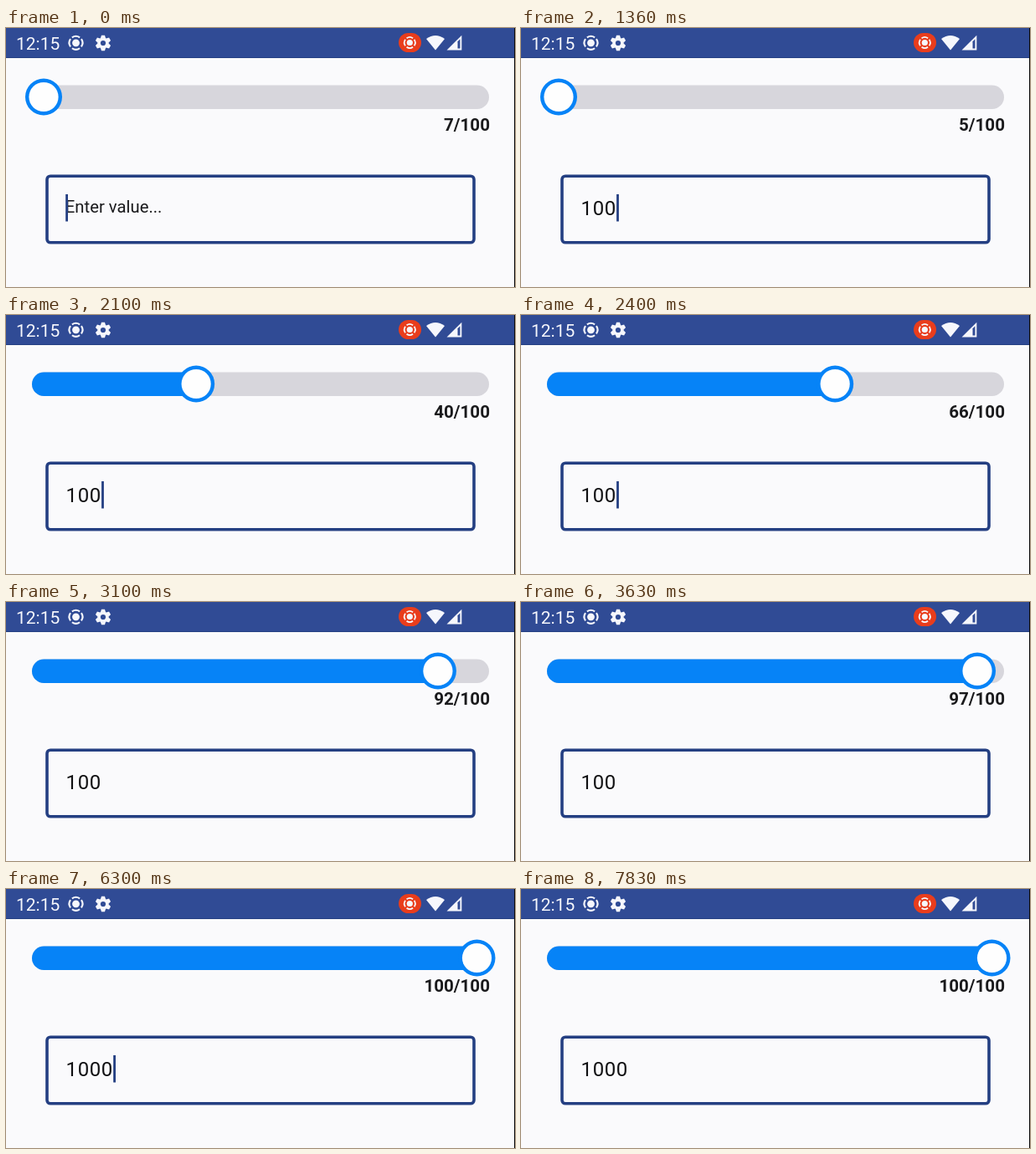
Recreate the animation shown at these times as an HTML page with a canvas. Size 608x310 px, loop 8 s.

```html
<!DOCTYPE html>
<html lang="en">
<head>
<meta charset="utf-8">
<title>Slider with input</title>
<style>
  html, body { margin: 0; width: 100%; height: 100%; overflow: hidden; background: #fafafc; }
  canvas { display: block; width: 608px; height: 310px; }
</style>
</head>
<body>
<canvas id="stage" width="608" height="310"></canvas>
<script>
const ctx = document.getElementById('stage').getContext('2d');
const LOOP = 8000, STEP = 100;
const BLUE = '#0683f7', NAVY = '#243f82', BAR = '#304b95', WHITE = '#f6f7fc';

// Slow start, fast middle, a short stall, then the rest.
const slide = [[1400, 0], [2100, 0.352], [2400, 0.638], [2700, 0.905], [3100, 0.91], [3900, 1]];
const typed = [[0, ''], [260, '1'], [960, '10'], [1360, '100'], [6300, '1000']];
const caret = [[0, true], [2900, false], [4200, true], [5460, false], [6300, true], [7830, false]];
const countdown = [[0, 7], [560, 6], [960, 5]];

const stepAt = (list, t) => list.filter(([at]) => at <= t).pop()[1];

// The slider refreshes about ten times a second.
function progressAt(t) {
  const held = Math.floor(t / STEP) * STEP;
  const i = slide.findIndex(([at]) => at > held);
  if (i < 0) return 1;
  if (i === 0) return 0;
  const [t0, v0] = slide[i - 1], [t1, v1] = slide[i];
  return v0 + (v1 - v0) * (held - t0) / (t1 - t0);
}

function rect(x, y, w, h, color) {
  ctx.fillStyle = color;
  ctx.fillRect(x, y, w, h);
}

function pill(x, y, w, h, color) {
  ctx.fillStyle = color;
  ctx.beginPath();
  ctx.roundRect(x, y, w, h, h / 2);
  ctx.fill();
}

function disc(x, y, r, color) {
  ctx.fillStyle = color;
  ctx.beginPath();
  ctx.arc(x, y, r, 0, Math.PI * 2);
  ctx.fill();
}

function polygon(points, color) {
  ctx.fillStyle = color;
  ctx.beginPath();
  points.forEach(([x, y]) => ctx.lineTo(x, y));
  ctx.fill();
}

function text(str, x, y, size, { color = '#1a1a1c', weight = 400, align = 'left', spacing = 0 } = {}) {
  ctx.font = `${weight} ${size}px Roboto, sans-serif`;
  ctx.letterSpacing = spacing + 'px';
  ctx.textAlign = align;
  ctx.fillStyle = color;
  ctx.fillText(str, x, y);
}

function recordIcon(x, y, size) {
  disc(x, y, size * 0.5, WHITE);
  ctx.strokeStyle = WHITE;
  ctx.lineWidth = size * 0.24;
  for (let i = 0; i < 4; i++) {
    const mid = i * Math.PI / 2;
    ctx.beginPath();
    ctx.arc(x, y, size * 0.9, mid - 0.62, mid + 0.62);
    ctx.stroke();
  }
}

function gearIcon(x, y) {
  disc(x, y, 6.8, WHITE);
  ctx.save();
  ctx.translate(x, y);
  for (let i = 0; i < 6; i++) {
    ctx.rotate(Math.PI / 3);
    polygon([[-3, -6], [-2, -9.3], [2, -9.3], [3, -6]], WHITE);
  }
  ctx.restore();
  disc(x, y, 3.1, BAR);
}

function wifiIcon() {
  ctx.fillStyle = WHITE;
  ctx.beginPath();
  ctx.moveTo(513, 26.5);
  ctx.lineTo(502, 13);
  ctx.quadraticCurveTo(513, 5, 524, 13);
  ctx.fill();
}

function signalIcon() {
  polygon([[526.5, 26.5], [544.3, 26.5], [544.3, 8.8]], WHITE);
  polygon([[539.5, 24.5], [542.4, 24.5], [542.4, 13.2], [539.5, 16.2]], BAR);
}

function statusBar() {
  rect(0, 0, 608, 35, BAR);
  rect(0, 35, 608, 1, NAVY);
  text('12:15', 12, 25.5, 21, { color: WHITE });
  recordIcon(83.5, 17.8, 8.8);
  gearIcon(116, 18);
  pill(469, 6, 27, 23, '#e93d1c');
  recordIcon(482.3, 17.5, 7.2);
  wifiIcon();
  signalIcon();
}

function slider(v) {
  const x = 45 + 517.5 * v;
  pill(31, 68.5, 546, 28.5, '#d7d6dc');
  if (v > 0) pill(31, 68.5, x - 31, 28.5, BLUE);
  disc(x, 82.5, 22, BLUE);
  disc(x, 82.5, 17.6, '#fefefe');
}

function inputBox(value, caretOn) {
  ctx.strokeStyle = NAVY;
  ctx.lineWidth = 3.6;
  ctx.beginPath();
  ctx.roundRect(49, 177.2, 510, 79.6, 4);
  ctx.stroke();

  if (value) text(value, 71.6, 224.2, 24, { spacing: 0.6, color: '#111113' });
  else text('Enter value...', 70.8, 221, 20.3);

  const x = value ? 71.8 + 14.1 * value.length : 71.2;
  if (caretOn) rect(x, 199, 2.8, 32.5, NAVY);
}

function draw(t) {
  const v = progressAt(t);
  const count = v > 0 ? Math.round(7 + 93 * v) : stepAt(countdown, t);
  rect(0, 0, 608, 310, '#fafafc');
  statusBar();
  slider(v);
  text(count + '/100', 578, 123, 20.6, { weight: 600, align: 'right' });
  inputBox(stepAt(typed, t), stepAt(caret, t));
  rect(607, 0, 1, 310, '#0a0a0c');
}

const start = performance.now();
function loop() {
  draw((performance.now() - start) % LOOP);
  requestAnimationFrame(loop);
}
loop();
</script>
</body>
</html>
```
